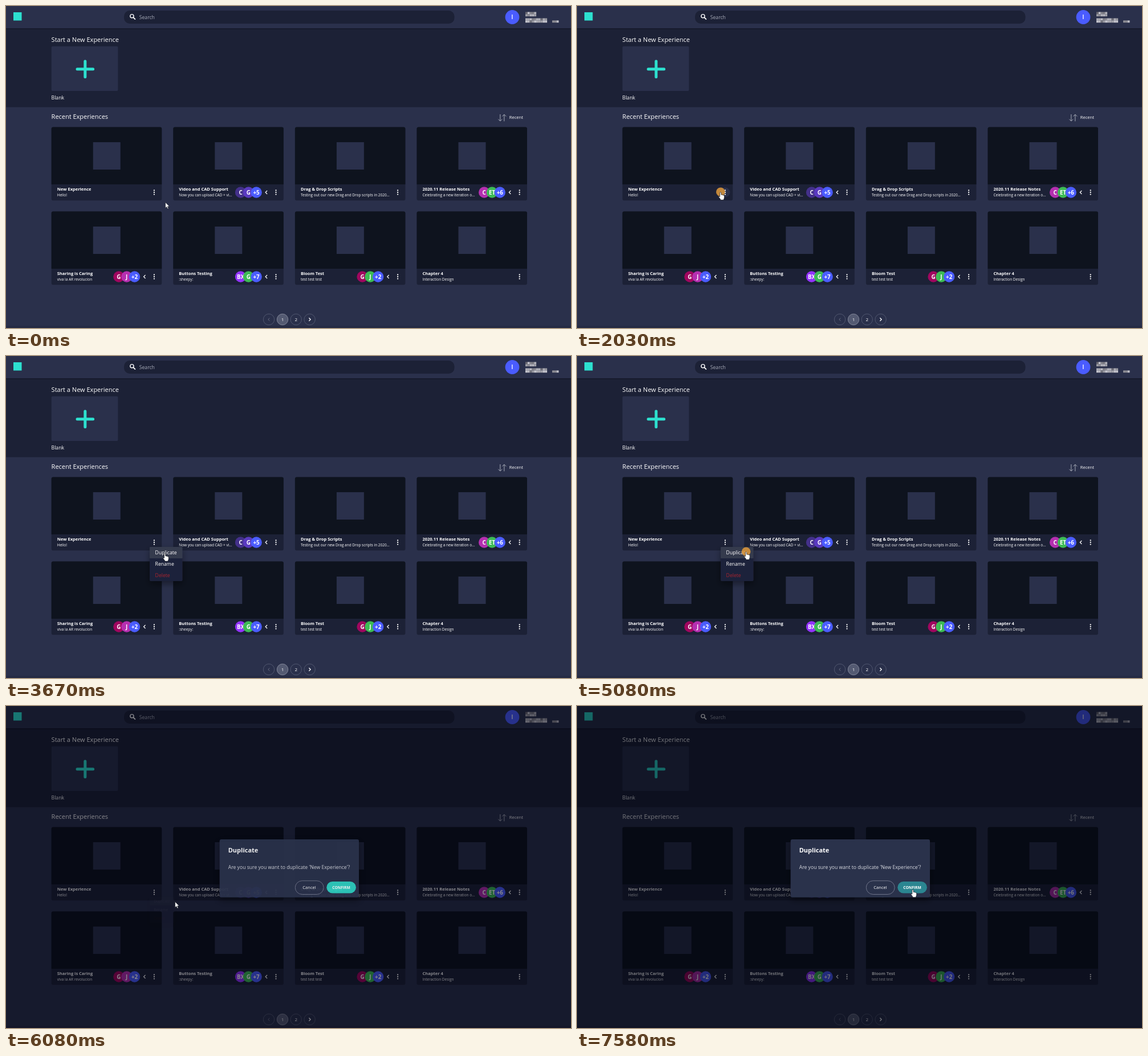
These frames come from a looping animation (991x565 px, 8000 ms). An HTML page:

```html
<!DOCTYPE html>
<html lang="en">
<head>
<meta charset="utf-8">
<title>Duplicate an experience</title>
<style>
html, body { margin: 0; width: 100%; height: 100%; overflow: hidden; background: #2a304b; }
svg { display: block; font-family: "Open Sans", "Noto Sans", sans-serif; }
</style>
</head>
<body>
<svg id="stage" width="991" height="565" viewBox="0 0 991 565">
  <defs>
    <filter id="soft" x="-30%" y="-30%" width="160%" height="180%">
      <feDropShadow dx="0" dy="5" stdDeviation="6" flood-color="#000" flood-opacity=".4"/>
    </filter>
  </defs>
  <g id="page"></g>
  <g id="menu" filter="url(#soft)"></g>
  <rect id="shade" width="991" height="565" fill="#00020c"/>
  <g id="dialog"></g>
  <circle id="click" r="7.8" fill="#e09a3c"/>
  <g id="cursor">
    <path id="arrow" d="M0 0V9.8L2.3 7.8L4 11.5L5.5 10.8L3.9 7.2H7Z" fill="#fff" stroke="#15181f" stroke-width=".6"/>
    <path id="hand" d="M-1.2 .8Q0 -.6 1.1 .8V4.6Q2.3 3.8 3.2 5Q4.4 4.4 5 5.6Q6.4 5.2 6.6 6.7V9.6Q6.4 11.4 5.6 12.3V13.7H-.3V12.4L-3.2 8.6Q-3.4 6.8 -1.2 8Z"
      fill="#fff" stroke="#15181f" stroke-width=".7"/>
  </g>
</svg>
<script>
const LOOP = 8000;
const BG = '#2a304b', DARK = '#1c2136', INK = '#0e131e', TEAL = '#2de0cf', BLUE = '#4a5cff';
const PLUM = '#a0065f', PINK = '#b52fb0', GREEN = '#3dbb55';
const $ = id => document.getElementById(id);

const rect = (x, y, w, h, fill, r = 0, more = '') =>
  `<rect x="${x}" y="${y}" width="${w}" height="${h}" rx="${r}" fill="${fill}" ${more}/>`;
const disc = (x, y, r, fill, more = '') => `<circle cx="${x}" cy="${y}" r="${r}" fill="${fill}" ${more}/>`;
const line = (d, color, w, more = '') => `<path d="${d}" fill="none" stroke="${color}" stroke-width="${w}" ${more}/>`;
const label = (x, y, size, str, fill = '#fff', more = '') =>
  `<text x="${x}" y="${y}" font-size="${size}" fill="${fill}" ${more}>${str.replace(/&/g, '&amp;')}</text>`;
const BOLD = 'font-weight="700"', MID = 'text-anchor="middle"';

const cards = [
  ['New Experience', 'Hello!'],
  ['Video and CAD Support', 'Now you can upload CAD + vi...', [['C', '#43308a'], ['G', '#5a3ac0'], ['+5', BLUE]]],
  ['Drag & Drop Scripts', 'Testing out our new Drag and Drop scripts in 2020...'],
  ['2020.11 Release Notes', 'Celebrating a new iteration o...', [['C', PINK], ['ET', GREEN], ['+6', BLUE]]],
  ['Sharing is Caring', 'viva la AR revolucion', [['G', PLUM], ['J', PINK], ['+2', BLUE]]],
  ['Buttons Testing', ':sheepy:', [['BX', '#9333ff'], ['G', GREEN], ['+7', BLUE]]],
  ['Bloom Test', 'test test test', [['G', PLUM], ['J', GREEN], ['+2', BLUE]]],
  ['Chapter 4', 'Interaction Design']
];

function card([title, note, people], i) {
  const x = 79.7 + 213.6 * (i % 4), y = i < 4 ? 212.5 : 360.5, mid = y + 114.5;
  let s = rect(x, y, 193.5, 128.7, DARK, 3) +
    `<path d="M${x} ${y + 100.5}v-97.5q0-3 3-3h187.5q3 0 3 3v97.5z" fill="${INK}"/>` +
    rect(x + 73, y + 26.5, 48, 48, BG) +
    label(x + 10, y + 111.2, 7.5, title, '#fff', BOLD) +
    label(x + 10, y + 121.6, 6.47, note);
  if (!i) s += disc(x + 180.2, mid, 8.5, BG, 'id="hover"');
  for (const dy of [-3.6, 0, 3.6]) s += disc(x + 180.2, mid + dy, 1.15, '#fff');
  if (people) {
    people.forEach(([who, color], k) => {
      const cx = x + 118.2 + 13.8 * k;
      s += disc(cx, mid, 9.7, color) + label(cx, mid + 3.6, 9.8, who, '#fff', BOLD + MID.padStart(MID.length + 1));
    });
    s += line(`M${x + 164.8} ${mid - 3}l-3 3l3 3`, '#fff', 1.2);
  }
  return s;
}

// Pixelated account name in the header
function mosaic() {
  let seed = 7, s = '';
  const rnd = () => (seed = seed * 16807 % 2147483647) / 2147483647;
  const block = (x, y, cols, rows) => {
    for (let i = 0; i < cols * rows; i++) {
      const v = 105 + Math.round(rnd() * 100);
      s += rect(x + i % cols * 3.8, y + Math.floor(i / cols) * 3.8, 3.9, 3.9, `rgb(${v},${v},${v + 8})`);
    }
  };
  block(911, 10.5, 5, 2);
  block(911, 21.5, 10, 2);
  block(958, 25.3, 3, 1);
  return s;
}

function pager() {
  const ring = (x, on) => disc(x, 550, 9.7, on ? '#545a72' : 'none', `stroke="${on ? '#9195a6' : '#5a6078'}" stroke-width=".8"`);
  return ring(461) + ring(485, true) + ring(508.7) + ring(532.6) +
    line('M462.3 547.5l-2.5 2.5l2.5 2.5', '#6b7085', 1) +
    line('M531.4 547.3l2.7 2.7l-2.7 2.7', '#fff', 1.3) +
    label(485, 552.9, 8, '1', '#fff', MID) + label(508.7, 552.9, 8, '2', '#fff', MID);
}

$('page').innerHTML =
  rect(0, 0, 991, 565, BG) + rect(0, 39.5, 991, 138, DARK) + rect(0, 39, 991, 2, '#171b2d') +
  rect(0, 561.5, 991, 3.5, '#252a43') +
  rect(13, 11, 14.5, 14.5, TEAL) +
  rect(207, 8, 579.5, 23, DARK, 10) +
  disc(220.9, 17.7, 3.1, 'none', 'stroke="#fff" stroke-width="1.4"') + line('M223.1 19.9l3.8 3.8', '#fff', 1.7) +
  label(233.8, 22.6, 8.64, 'Search', '#a9adba') +
  disc(888, 19.5, 12.4, BLUE) + label(888, 23.4, 10.8, 'I', '#fff', 'font-weight="600" ' + MID) + mosaic() +
  label(79.6, 62.6, 11, 'Start a New Experience') +
  rect(79.7, 70.8, 116.7, 78.2, BG, 2) +
  line('M138.8 97v27.6M125 110.8h27.6', TEAL, 5, 'stroke-linecap="round"') +
  label(79.6, 163.6, 8.64, 'Blank') +
  label(79.6, 197.6, 11, 'Recent Experiences') +
  line('M866.8 190v12M863.4 198.6l3.4 3.4l3.4-3.4M873.8 202.3v-12M870.4 193.7l3.4-3.4l3.4 3.4', '#a9adba', 1) +
  label(882.8, 198.4, 7.55, 'Recent') +
  cards.map(card).join('') + pager();

$('menu').innerHTML = rect(252, 335, 57.5, 60, '#1f243a', 2) +
  rect(252, 335, 57.5, 20, '#fff', 1, 'id="item"') +
  label(261.6, 348.3, 8.64, 'Duplicate') + label(261.6, 368.2, 8.64, 'Rename') +
  label(261.6, 388.2, 8.64, 'Delete', '#a8222f');

$('dialog').innerHTML = rect(374.7, 234, 244.3, 101.7, BG, 3, 'filter="url(#soft)"') +
  label(389.7, 257, 11, 'Duplicate', '#fff', BOLD) +
  label(389.7, 286, 8.63, "Are you sure you want to duplicate 'New Experience'?", '#d9dbe2') +
  rect(507.3, 306.7, 49.8, 23.8, 'none', 11.9, 'stroke="#767b90" stroke-width=".9"') +
  label(532, 321.4, 7.55, 'Cancel', '#fff', MID) +
  rect(562.3, 308, 51.6, 20.6, TEAL, 10.3, 'id="confirm"') +
  label(588, 320.9, 6.7, 'CONFIRM', '#fff', BOLD + ' ' + MID);

// Value held since the last listed time
const hold = (t, table) => {
  let v = table[0][1];
  for (const [at, next] of table) if (t >= at) v = next;
  return v;
};
// n equal jumps, the first at a and the last at b
const jumps = (t, a, b, n) =>
  t < a ? 0 : Math.min(1, (Math.floor((t - a) * (n - 1) / (b - a) + .1) + 1) / n);
const ease = p => p * p * (3 - 2 * p);

// Curved moves: from, to, sag
const moves = [
  { a: 620, b: 950, n: 5, from: [279.6, 344.6], to: [251.8, 326.6], sag: 0 },
  { a: 3280, b: 3990, n: 10, from: [251.8, 326.6], to: [296.6, 343.6], sag: 40 },
  { a: 6550, b: 7340, n: 11, from: [296.6, 343.8], to: [589, 322], sag: 110, ease }
];
function pointer(t) {
  const m = moves.filter(k => t >= k.a).pop() || moves[0];
  const raw = jumps(t, m.a, m.b, m.n), p = m.ease ? m.ease(raw) : raw;
  const at = i => m.from[i] + (m.to[i] - m.from[i]) * p;
  return [at(0), at(1) + m.sag * p * (1 - p)];
}

const HAND = [[0, 0], [860, 1], [2240, 0], [3510, 1], [5930, 0], [7260, 1]];
const HOVER = [[0, 0], [780, .5], [860, 1], [2240, 0]];
const MENU = [[0, 0], [2160, .35], [2240, .85], [2320, 1], [6000, .9], [6080, .07], [6160, 0]];
const SIZE = [[0, .85], [2240, .95], [2320, 1], [6080, .75]];
const ITEM = [[0, 0], [3510, .1], [5230, .13], [5390, .16], [5930, .21]];
const SHADE = [[0, 0], [5930, .02], [6000, .14], [6080, .47], [6160, .52], [6240, .54]];
const DIALOG = [[0, 0], [5930, .02], [6000, .28], [6080, .93], [6160, .98], [6240, 1]];
const CLICK = [[0, 0], [2030, .85], [2160, .6], [2240, .4], [2320, .2], [2400, 0],
  [5080, .85], [5150, .7], [5230, .5], [5310, .3], [5390, .12], [5460, 0]];
const PRESS = [[0, 0], [7340, .2], [7420, .5], [7500, .8], [7580, 1]];

const set = (id, name, v) => $(id).setAttribute(name, v);

function draw(t) {
  const [x, y] = pointer(t), hand = hold(t, HAND), k = hold(t, SIZE), press = hold(t, PRESS);
  set('cursor', 'transform', `translate(${x} ${y})`);
  set('hand', 'opacity', hand);
  set('arrow', 'opacity', 1 - hand);
  set('hover', 'opacity', hold(t, HOVER));
  set('menu', 'opacity', hold(t, MENU));
  set('menu', 'transform', `translate(252 335) scale(${k}) translate(-252 -335)`);
  set('item', 'opacity', hold(t, ITEM));
  set('shade', 'opacity', hold(t, SHADE));
  set('dialog', 'opacity', hold(t, DIALOG));
  set('click', 'cx', x);
  set('click', 'cy', y - .4);
  set('click', 'opacity', hold(t, CLICK));
  const mix = (from, to) => Math.round(from + (to - from) * press);
  set('confirm', 'fill', `rgb(${mix(47, 43)},${mix(207, 134)},${mix(193, 145)})`);
}

const start = performance.now();
function tick() {
  draw((performance.now() - start) % LOOP);
  requestAnimationFrame(tick);
}
tick();
</script>
</body>
</html>
```
